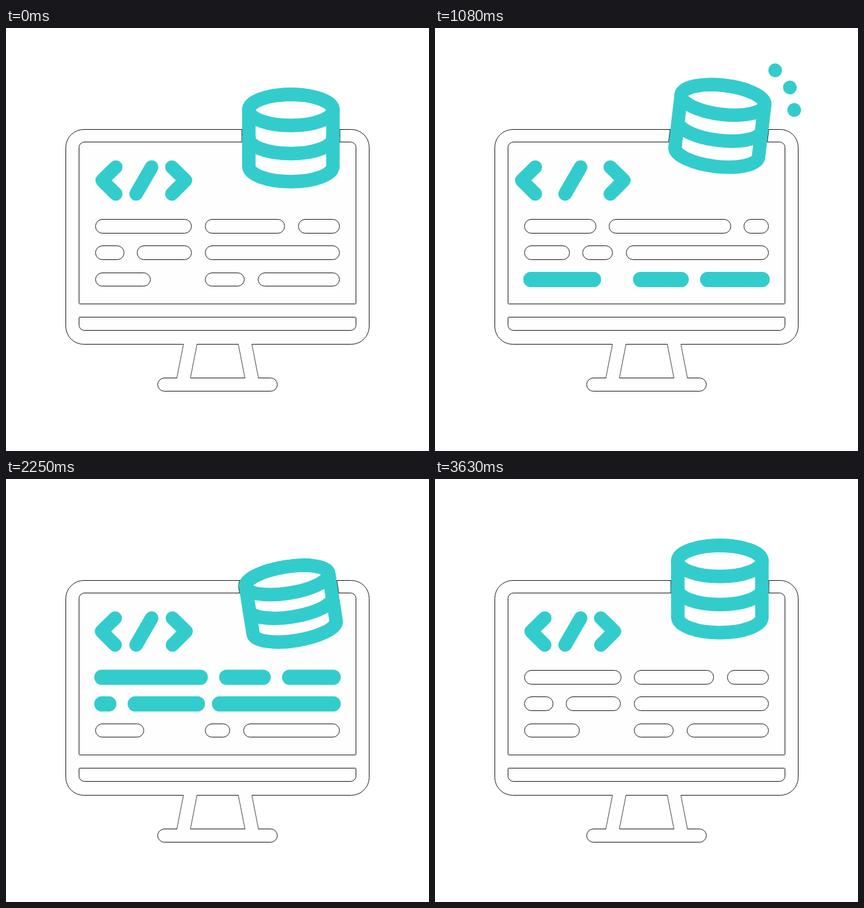
Recreate the animation shown at these times as an HTML page with a canvas. Size 640 px wide and 640 px high, loop 3660 ms.

```html
<!DOCTYPE html>
<html>
<head>
<meta charset="utf-8">
<style>
  html, body { margin: 0; width: 100%; height: 100%; overflow: hidden; background: #fff; }
  canvas { display: block; }
</style>
</head>
<body>
<canvas width="640" height="640"></canvas>
<script>
const ctx = document.querySelector('canvas').getContext('2d');
const LOOP = 3660, TEAL = '#33cccc', INK = '#222', PAPER = '#fefefe';

// Eased progress from 0 to 1 between two times.
function ease(t, from, to) {
  const p = Math.min(1, Math.max(0, (t - from) / (to - from)));
  return (1 - Math.cos(Math.PI * p)) / 2;
}

// Swings from 0 through evenly spaced stops and back to 0.
function swing(t, delay, span, ...stops) {
  let value = 0, last = 0;
  [...stops, 0].forEach((stop, i) => {
    value += (stop - last) * ease(t, delay + i * span, delay + (i + 1) * span);
    last = stop;
  });
  return value;
}

function line(points, color, width) {
  ctx.beginPath();
  points.forEach(([x, y]) => ctx.lineTo(x, y));
  ctx.strokeStyle = color;
  ctx.lineWidth = width;
  ctx.stroke();
}

function box(x1, y1, x2, y2, radius) {
  const [l, t, r, b] = [x1, y1, x2, y2].map(v => Math.floor(v) + .5);
  ctx.beginPath();
  ctx.roundRect(l, t, r - l, b - t, radius);
  ctx.fillStyle = PAPER;
  ctx.fill();
  ctx.strokeStyle = INK;
  ctx.lineWidth = 1;
  ctx.stroke();
}

function leg(top, foot) {
  ctx.fillStyle = PAPER;
  ctx.beginPath();
  [[top, 477], [top + 20.5, 477], [foot + 20.5, 531], [foot, 531]].forEach(p => ctx.lineTo(...p));
  ctx.fill();
  for (const dx of [0, 20.5]) line([[top + dx, 478.5], [foot + dx, 529.5]], INK, .8);
}

function monitor() {
  box(90, 153, 549, 478, 27);
  box(110, 172, 529, 417, [8, 8, 1, 1]);
  box(110, 437, 529, 457, [1, 1, 8, 8]);
  box(229, 529, 410, 549, 10);
  leg(268.5, 258.5);
  leg(351.5, 361.5);
}

function codeSign(t) {
  const spread = swing(t, 0, 910, 16.2, -6.5, 9.7);
  for (const side of [-1, 1]) {
    const x = 208.5 + side * (42.5 + spread);
    line([[x, 210.5], [x + side * 20.5, 230.5], [x, 251]], TEAL, 20.6);
  }
  line([[220.3, 210.5], [196.9, 251]], TEAL, 20.6);
}

function bar(x1, x2, y, lit) {
  if (lit) line([[x1 + 10, y], [x2 - 10, y]], TEAL, 23);
  else box(x1, y - 10.3, x2 - .5, y + 10.3, 10.2);
}

function textRows(t) {
  const isLit = row => {
    const phase = t % (LOOP / 2) - 105 - 300 * row;
    return phase >= 0 && phase < 525;
  };
  const gapA = 291.5 + swing(t, 0, 1040, -38, 24);
  const gapB = 432 + swing(t, 0, 1040, 25.7, -24.5);
  const gapC = 188.5 + swing(t, 150, 1030, 26, -13);
  const gapD = 291.3 + swing(t, 150, 975, -12, 12.5);
  const gapE = 228.5 + swing(t, 300, 1050, 37, -12.3);
  const gapF = 371 + swing(t, 300, 1050, 25.4, -24);
  const stretch = isLit(1) ? 6.5 : 0;
  const rows = [
    [[135, gapA - 10], [gapA + 10, gapB - 10], [gapB + 10, 505]],
    [[135, gapC - 10], [gapC + 10, gapD - 10 + stretch], [gapD + 10, 505]],
    [[135, gapE - 10], [301, gapF - 10], [gapF + 10, 505]]
  ];
  rows.forEach((bars, row) => {
    for (const [x1, x2] of bars) bar(x1, x2, 300 + 40.25 * row, isLit(row));
  });
}

function database(t) {
  const rise = ease(t, 600, 1250), fall = ease(t, 1675, 2250), settle = ease(t, 2250, 2850);
  const lift = -27 * rise + 39.5 * fall - 12.5 * settle;
  const tilt = 8 * rise - 17 * fall + 9 * settle;
  const squash = 1 + swing(t, 0, 685, -.175, 0, -.18);
  const rx = 63.6, ry = 23.5 * squash, h = 42.5 * squash;
  const place = () => {
    ctx.translate(431, 232.5 - 66 * squash + lift);
    ctx.rotate(tilt * Math.PI / 180);
  };
  const outline = new Path2D();
  outline.ellipse(0, -h, rx, ry, 0, Math.PI, 2 * Math.PI);
  outline.ellipse(0, h, rx, ry, 0, 0, Math.PI);
  outline.closePath();
  const bands = new Path2D();
  bands.ellipse(0, -h, rx, ry, 0, 0, 2 * Math.PI);
  bands.moveTo(rx, 0);
  bands.ellipse(0, 0, rx, ry, 0, 0, Math.PI);

  // Dark edge where the drum cuts the monitor frame.
  ctx.save();
  ctx.beginPath();
  ctx.rect(0, 153, 640, 20);
  ctx.clip();
  place();
  ctx.strokeStyle = INK;
  ctx.lineWidth = 22;
  ctx.stroke(outline);
  ctx.restore();

  ctx.save();
  place();
  ctx.fillStyle = PAPER;
  ctx.fill(outline);
  ctx.strokeStyle = TEAL;
  ctx.lineWidth = 20.4;
  ctx.stroke(outline);
  ctx.stroke(bands);
  ctx.restore();
}

// Three dots fly outward from one point and draw back.
function sparks(t) {
  if (t < 990 || t > 2130) return;
  const retreat = ease(t, 1620, 2130);
  const head = .39 * ease(t, 1080, 1480) - .22 * retreat;
  const tail = .27 * ease(t, 1150, 1620) - .1 * retreat;
  for (const [x, y] of [[514.7, 64], [537, 90], [543.5, 124]]) {
    const at = k => [x + (x - 490) * k, y + (y - 133.6) * k];
    line([at(tail), at(head + .001)], TEAL, 20.8);
  }
}

const start = performance.now();
function frame() {
  const t = (performance.now() - start) % LOOP;
  ctx.fillStyle = '#fff';
  ctx.fillRect(0, 0, 640, 640);
  ctx.lineCap = ctx.lineJoin = 'round';
  monitor();
  codeSign(t);
  textRows(t);
  database(t);
  sparks(t);
  requestAnimationFrame(frame);
}
frame();
</script>
</body>
</html>
```
